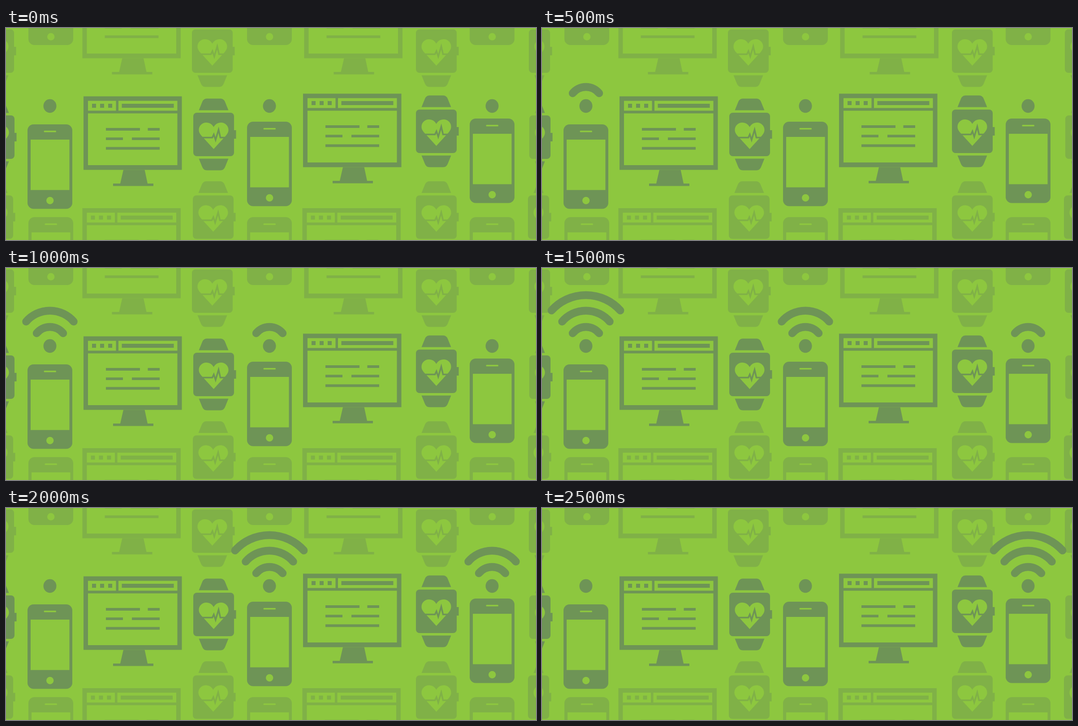
An HTML page for the animation above (3 s loop, 1183 px wide and 473 px high).

```html
<!DOCTYPE html>
<html lang="en">
<head>
<meta charset="utf-8">
<title>Connected devices</title>
<style>
  html, body { margin: 0; height: 100%; overflow: hidden; background: #8dc73f; }
  svg { display: block; width: 1183px; height: 473px; }
  .cut { fill: #8dc73f; }
  .line { fill: none; stroke: currentColor; }
  .dark { color: #6e9456; fill: currentColor; }
  .pale { color: #80b147; fill: currentColor; }
</style>
</head>
<body>
<svg id="stage" viewBox="0 0 1183 473">
  <defs>
    <g id="phone">
      <rect width="100" height="188.5" rx="13.5"/>
      <g class="cut">
        <rect x="36.5" y="14" width="27.5" height="3.5" rx="1.5"/>
        <rect x="7" y="34" width="86.5" height="112.5"/>
        <circle cx="50.2" cy="170" r="8.2"/>
      </g>
    </g>
    <g id="monitor">
      <rect width="219.5" height="164"/>
      <path d="M89 164h47.5l6.5 30.5h13v5.5h-90v-5.5h16z"/>
      <path class="cut" d="M10 10h62.5v22h-62.5zM78 10h131.5v22h-131.5zM10 38h199.5v115.500h-199.500z"/>
      <path d="M19 16.500h9v9h-9zM37 16.500h9v9h-9zM55 16.500h9v9h-9zM85.500 16.500h116v9h-116z"/>
      <path class="line" stroke-width="5.800" d="M50 73.500h76m17.500 0h26.500M50 94.700h38m20 0h62M50 116h120"/>
    </g>
    <path id="strap" d="M12.500 -5.500L20 -24Q23 -31.500 30 -31.500H61Q68 -31.500 71 -24L78.500 -5.500z"/>
    <g id="watch">
      <use href="#strap"/>
      <use href="#strap" transform="matrix(1 0 0 -1 0 97)"/>
      <rect width="91" height="97" rx="8"/>
      <rect x="88" y="39" width="7.500" height="19"/>
      <path class="cut" d="M45.500 81L18 51C14 46 12.500 43 12.500 38C12.500 29 20 22 29 22C36 22 42 25.500 45.500 32C49 25.500 55 22 62 22C71 22 78.500 29 78.500 38C78.500 43 77 46 73 51z"/>
      <path class="line" stroke-width="3.600" stroke-miterlimit="10" d="M16 55.500H42.500L45.800 48.500L49.800 60.500L56.500 38L60.500 55.500H76"/>
    </g>
  </defs>
</svg>
<script>
const stage = document.getElementById('stage');

function add(tag, attrs, parent = stage) {
  const el = document.createElementNS('http://www.w3.org/2000/svg', tag);
  for (const name in attrs) el.setAttribute(name, attrs[name]);
  return parent.appendChild(el);
}

function place(shape, tone, spots) {
  for (const [x, y] of spots) add('use', { href: '#' + shape, class: tone, x, y });
}

const phoneXs = [48, 538, 1035];

place('phone', 'pale', [50, 538, 1035].flatMap(x => [[x, -150.5], [x, 422]]));
place('monitor', 'pale', [[170.5, -96.5], [665.5, -96.5], [170.5, 402], [661.5, 402]]);
place('watch', 'pale', [
  [-73, 3], [415, 3], [915, 3], [1167, 3], [1168, 195],
  [-75, 373.5], [417, 373.5], [915, 373.5], [1165, 373.5]
]);
place('phone', 'dark', phoneXs.map((x, i) => [x, [215, 209, 202][i]]));
place('monitor', 'dark', [[173, 152.5], [663, 146.5]]);
place('watch', 'dark', [[-72, 195], [418, 189], [915, 182]]);

// Each arc: half width, end height, radius
const arcs = [[29.5, 145.5, 38], [53, 119.5, 70], [76.7, 94.7, 103]];

const signals = phoneXs.map(x => {
  const group = add('g', { class: 'dark', transform: `translate(${x + 50})` });
  add('ellipse', { cy: 174, rx: 14.5, ry: 15.3 }, group);
  return arcs.map(([w, y, r]) => add('path', {
    class: 'line', 'stroke-width': 17.5, 'stroke-linecap': 'round',
    d: `M${-w} ${y}A${r} ${r} 0 0 1 ${w} ${y}`
  }, group));
});

function draw(now) {
  const step = Math.floor(now % 3000 / 500);
  signals.forEach((bars, i) => {
    const count = step - i > 3 ? 0 : step - i;
    bars.forEach((bar, k) => bar.setAttribute('visibility', k < count ? 'visible' : 'hidden'));
  });
}

const start = performance.now();
function tick() {
  draw(performance.now() - start);
  requestAnimationFrame(tick);
}
tick();
</script>
</body>
</html>
```
